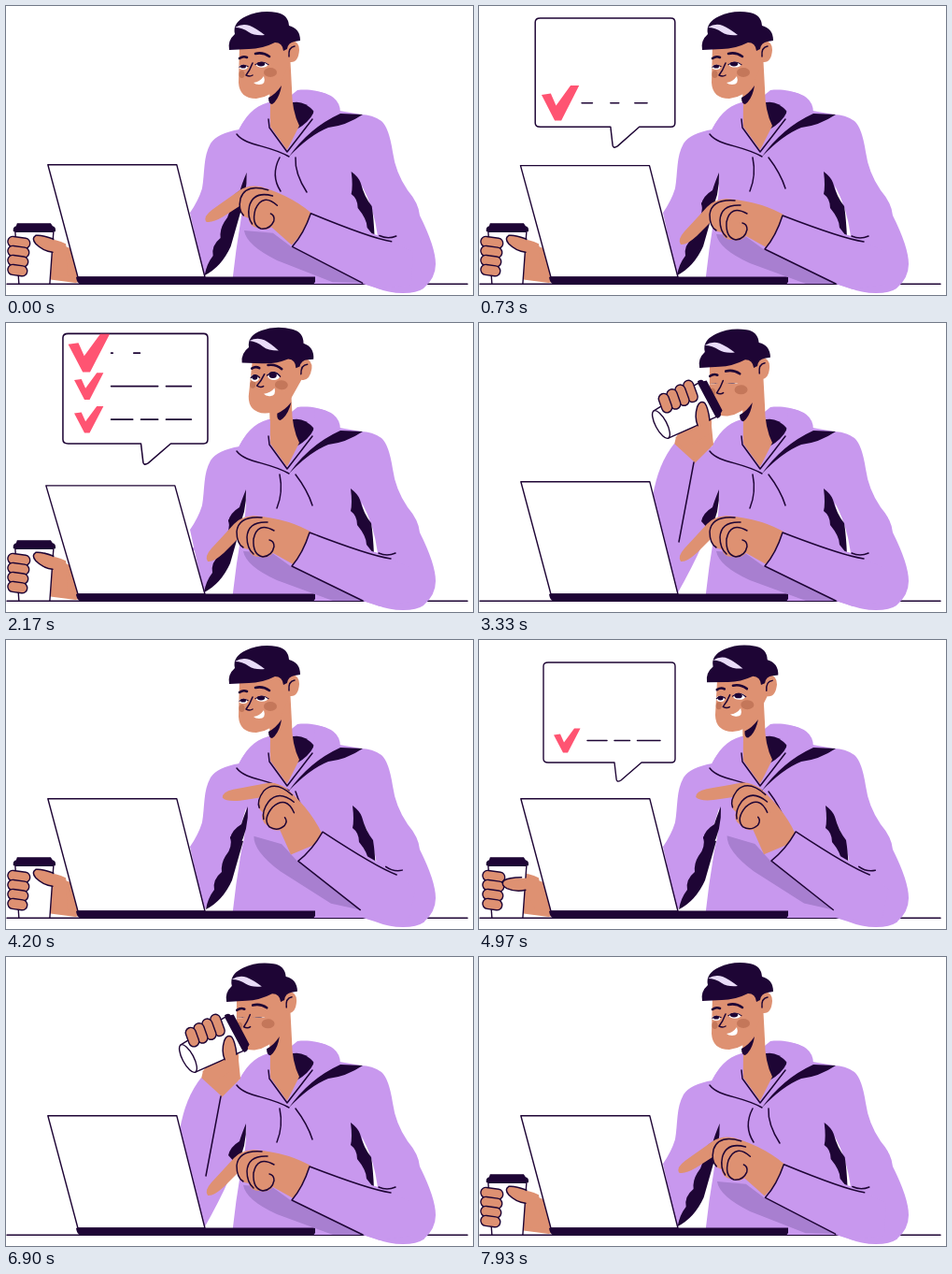
An HTML page that plays this animation: 500x309 px, repeating every 7960 ms.

```html
<!DOCTYPE html>
<html lang="en">
<head>
<meta charset="utf-8">
<title>Checklist at the laptop</title>
<style>
html, body { margin: 0; width: 100%; height: 100%; overflow: hidden; background: #fff }
svg { display: block; width: 100%; height: 100% }
.lilac { fill: #c898ee }
.shade { fill: #a87fd0 }
.dark { fill: #1e0535 }
.skin { fill: #de9172 }
.blush { fill: #c4775a }
.white { fill: #fff }
.red { fill: #ff5472 }
.line { fill: none; stroke: #1e0535; stroke-width: 1.5; stroke-linecap: round; stroke-linejoin: round }
.edge { stroke: #1e0535; stroke-width: 1.4; stroke-linejoin: round }
.brow { stroke-width: 2.6 }
</style>
</head>
<body>
<svg viewBox="0 0 500 309">
  <path class="line" d="M1 297.300H494"/>

  <!-- body -->
  <path class="lilac" d="M250 132Q226 136 219 147C211 161 213 178 210 195Q206 208 197 221L212 290Q228 262 240 235L257 180Q258 202 252 225Q246 260 242 297H382L395 301Q410 307 425 307Q440 307 447 302Q460 291 460 276Q460 258 443 224Q442 211 430 197Q417 178 414 156Q410 130 402 123Q392 116 380 116L357 112C354 93 330 88 312 90L296 103H281C265 107 255 120 250 132Z"/>
  <path class="white" d="M381 192Q394 216 398 246L391 244Z"/>
  <g id="folds" class="dark">
    <path d="M257 178Q252 190 250 197Q240 203 238 212L247 222Q258 203 257 178Z"/>
    <path id="lowFold" d="M238 210Q241 222 233 231Q228 239 229 248Q219 256 221 267Q214 276 212 288Q230 279 240 257L252 215Z"/>
    <path d="M369 177Q371 193 369 201Q376 206 376 216Q386 228 386 237Q391 243 394 248Q393 226 391 214Q383 204 379 189Q377 183 369 177Z"/>
  </g>

  <!-- neck and hood -->
  <path class="dark" d="M304 104Q318 99 330 113Q324 125 311 132L300 128Z"/>
  <path class="skin" d="M282 84L283 129L301 154L314 128Q306 112 306 88L304 50Z"/>
  <path class="lilac" d="M283 104Q257 112 247 137C257 150 280 149 300 161L282 130Z"/>
  <path class="lilac" d="M330 91Q358 94 358 114Q330 123 304 161L301 153L326 124Q331 116 330 91Z"/>
  <path class="dark" d="M303 161Q325 130 358 115L382 116Q364 128 345 130Q325 138 303 161Z"/>
  <path class="line" d="M247 137C257 150 280 148 303 161M281 121L282 130L301 156L328 121"/>
  <path id="strings" class="line"/>

  <g id="head">
    <path class="dark" d="M295 85Q289 94 281 98Q281 105 285 105Q291 101 294 90Z"/>
    <path class="skin" d="M250 40L249 82Q250 99 268 99Q285 97 293 84L304 60Q313 61 314 47Q314 38 306 37L295 28Z"/>
    <path class="dark" d="M239 47Q237 37 245 30Q242 18 257 11Q272 4 290 7Q302 9 303 21Q315 24 315 37L309 38Q302 39 301 46L297 48Q296 39 288 39Q274 46 260 46Z"/>
    <path fill="#e9dcf8" d="M245 23Q253 18 261 21Q268 24 277 31Q266 32 260 28Q253 23 245 23Z"/>
    <path class="line" d="M303 54Q302 44 309 43"/>
    <g id="face">
      <ellipse class="blush" cx="283" cy="71" rx="7" ry="5"/>
      <ellipse class="blush" cx="252.500" cy="73" rx="3" ry="4"/>
      <path class="line brow" d="M250 56Q254 53 258 55M267 51Q275 49 282 54"/>
      <path class="line" d="M264 61Q261 69 257 74Q261 76 264 74"/>
      <g id="eyes">
        <ellipse class="white" cx="254" cy="66" rx="4.500" ry="4"/>
        <ellipse class="white" cx="274" cy="62" rx="6.500" ry="4.500"/>
        <ellipse class="dark" cx="254" cy="65" rx="3" ry="3"/>
        <ellipse class="dark" cx="273" cy="61" rx="4.200" ry="3.600"/>
        <path class="line" d="M250 66Q254 60 259 65M267 62Q274 54 281 62"/>
      </g>
      <path id="smile" class="white" d="M265 82Q272 81 276 75Q279 84 271 84Q267 84 265 82Z"/>
    </g>
  </g>

  <!-- arm with cup -->
  <g id="cupArm">
    <path class="skin" d="M211 122L238 84Q250 92 249 110L251 130L231 150L209 130Z"/>
    <path class="lilac" d="M209 129L231 149L214 236L200 262Q178 232 186 185Q192 150 209 129Z"/>
    <path class="line" d="M230 149L214 234"/>
  </g>
  <g id="cup">
    <path class="skin" d="M44 249Q54 249 64 254L72 288L50 290Z"/>
    <path class="white edge" d="M10 241H51L47 297H14Z"/>
    <ellipse id="cupBase" class="white edge" cx="30.500" cy="297" rx="16.500"/>
    <path class="dark" d="M12 232H48L50 235Q54 236 53 241H8Q7 236 11 235Z"/>
    <g id="fingers" class="skin edge"></g>
    <g id="thumb">
      <path class="skin" d="M64 254Q54 252 47 248Q38 244 32 245Q27 248 32 254Q40 262 50 263L52 289H66Z"/>
      <path class="line" d="M51 249Q38 244 32 245Q27 248 32 254Q40 262 50 263"/>
    </g>
  </g>

  <!-- laptop -->
  <path id="lid" class="white edge"/>
  <path class="dark" d="M76 289.500H331V295Q330 297.500 327 297.500H80Q76 297 75 290Z"/>

  <!-- typing arm -->
  <g id="forearm">
    <path class="shade" d="M254 244Q257 260 290 275L350 297H382L306 261L285 246Z"/>
    <g id="hand">
      <path class="skin" d="M328 226Q301 209 262 206Q248 207 241 215Q231 226 217 241Q209 250 213 255Q219 256 230 246L245 231Q247 242 257 242Q260 251 269 250Q277 252 283 246L308 260Z"/>
      <path class="line" d="M271 208Q246 206 244 223Q244 236 251 240M277 213Q256 212 255 229Q255 241 262 247M284 222Q266 212 262 231Q261 248 272 250Q282 249 284 239Q284 233 279 232"/>
    </g>
    <path class="lilac" d="M325 223L398 246L435 262V298L400 303L382 297L306 260Q318 246 325 223Z"/>
    <path class="line" d="M412 252Q390 249 325 224Q318 246 306 260L382 297M399 246Q408 250 417 246"/>
  </g>

  <!-- speech bubble -->
  <g id="bubble">
    <path class="white edge" d="M74 24H206Q210 24 210 28V127Q210 131 206 131H174L152 150Q147 153 147 148L145 131H74Q69 131 69 127V28Q69 24 74 24Z"/>
    <g id="rows"></g>
  </g>
</svg>
<script>
const PERIOD = 3980, FIRST = 500, BEAT = 750;
const GAPS = [[141, 165.5], [165.5], [134]];   // breaks in each written line

const $ = id => document.getElementById(id);
const set = (id, value) => $(id).setAttribute('transform', value);
const lerp = (a, b, k) => a + (b - a) * k;
const clamp = k => Math.min(1, Math.max(0, k));
const ease = k => { k = clamp(k); return k * k * (3 - 2 * k); };
// smooth hill of height 1 around x = 0
const bump = (x, width) => Math.abs(x) < width ? Math.cos(Math.PI * x / width / 2) ** 2 : 0;
// rises from a to b, falls from c to d
const between = (t, a, b, c, d) => ease((t - a) / (b - a)) * (1 - ease((t - c) / (d - c)));

// time since each tap on the keyboard
const taps = t => GAPS.map((_, i) => t - FIRST - BEAT * i);
const sumTaps = (t, f) => taps(t).reduce((s, d) => s + f(d), 0);

$('rows').innerHTML = GAPS.map((_, i) =>
  `<path id="tick${i}" class="red" d="M-14-6L-7-7L-3 2L8-13H14.500L1 13H-4Z"/>` +
  `<path id="dash${i}" class="line"/>`).join('');

for (let i = 0; i < 4; i++) {
  $('fingers').innerHTML +=
    `<rect x="2" y="${247 + 10 * i}" width="${24 - i}" height="11" rx="5.5" transform="rotate(8 14 ${252 + 10 * i})"/>`;
}

function drawBubble(t) {
  const pop = .11 * sumTaps(t, d => bump(d - 195, 120));
  const show = between(t, 240, 380, 2600, 2750) + .15 * bump(t - 400, 100);
  const first = t < FIRST + BEAT ? pop : 0;
  const sx = show * (1 + pop - first * .3), sy = show * (1 + pop);
  set('bubble', `translate(${150 - first * 44} 151) scale(${sx} ${sy}) translate(-150 -151)`);
  taps(t).forEach((d, i) => {
    const y = 107.5 - 32.3 * i, drawn = clamp((d - 155) / 150);
    set('tick' + i, `translate(94 ${y}) scale(${ease(d / 100) * (1 + .42 * bump(d - 170, 200))})`);
    const starts = [116, ...GAPS[i].map(g => g + 4)];
    const ends = [...GAPS[i].map(g => g - 4), 194];
    $('dash' + i).setAttribute('d', drawn ?
      starts.map((a, j) => `M${a} ${y}H${lerp(a, ends[j], drawn)}`).join('') : '');
  });
}

// the cup swings around the elbow at (195, 250)
function drawCup(t, lift) {
  const loose = bump(t - FIRST - BEAT + 265, 250);
  const turn = lerp(-118, 0, lift), a = turn * Math.PI / 180;
  const x = lerp(64, 28, lift), y = lerp(-153, -157, lift);
  const cx = 195 + x * Math.cos(a) - y * Math.sin(a);
  const cy = 250 + x * Math.sin(a) + y * Math.cos(a);
  set('cupArm', `rotate(${turn} 195 250)`);
  set('cup', `translate(${cx} ${cy}) rotate(${62 * lift}) translate(-30 -265)`);
  set('thumb', `rotate(${-22 * loose} 60 265)`);
  set('fingers', `translate(${2 * loose} 0)`);
  $('cupBase').setAttribute('ry', 6 * lift);
  $('lowFold').style.opacity = 1 - ease(lift * 3);
}

function drawTyping(t) {
  const rest = 1 - between(t, 0, 450, 3500, 3900);
  const raise = Math.max(.33 * rest, sumTaps(t, d => bump(d + 265, 250)));
  const bend = 12.4 * raise * raise;
  set('forearm', `rotate(${bend} 420 280)`);
  set('hand', `translate(${3 - 7 * raise} 0) rotate(${37 * raise - bend} 316 241)`);
  set('folds', `translate(${2 * raise} 0)`);

  const p = (a, b) => lerp(a, b, rest);
  $('strings').setAttribute('d',
    `M293 162Q${p(297, 283)} 181 ${p(290, 294)} 198M310 162Q${p(323, 309)} 179 ${p(328, 322)} ${p(195, 199)}`);

  const dip = .3 + 7 * sumTaps(t, d => bump(d - 90, 180));
  const top = 169.5 + dip, left = 45 - dip * .5;
  $('lid').setAttribute('d', `M${left} ${top}H${left + 138}L213 290H77Z`);
}

function drawHead(t, lift) {
  const look = .35 * between(t, 730, 1000, 2600, 2850) + bump(t - 2260, 200) - .2 * lift;
  const shut = between(t, 2650, 2800, 3450, 3600);
  const open = lerp(.65, 1, clamp(look)) * (1 - .9 * shut);
  set('head', `translate(${8 * look} 0) rotate(${5 * look} 298 120)`);
  set('face', `translate(0 ${-4 * Math.max(0, look)})`);
  set('eyes', `translate(0 ${64 * (1 - open)}) scale(1 ${open})`);
  $('smile').style.opacity = 1 - shut;
}

function draw(now) {
  const t = now % PERIOD;
  const lift = between(t, 2180, 2780, 3350, 3880);
  drawHead(t, lift);
  drawCup(t, lift);
  drawTyping(t);
  drawBubble(t);
}

const start = performance.now();
function loop(now) {
  draw(Math.max(0, now - start));
  requestAnimationFrame(loop);
}
draw(0);
requestAnimationFrame(loop);
</script>
</body>
</html>
```
